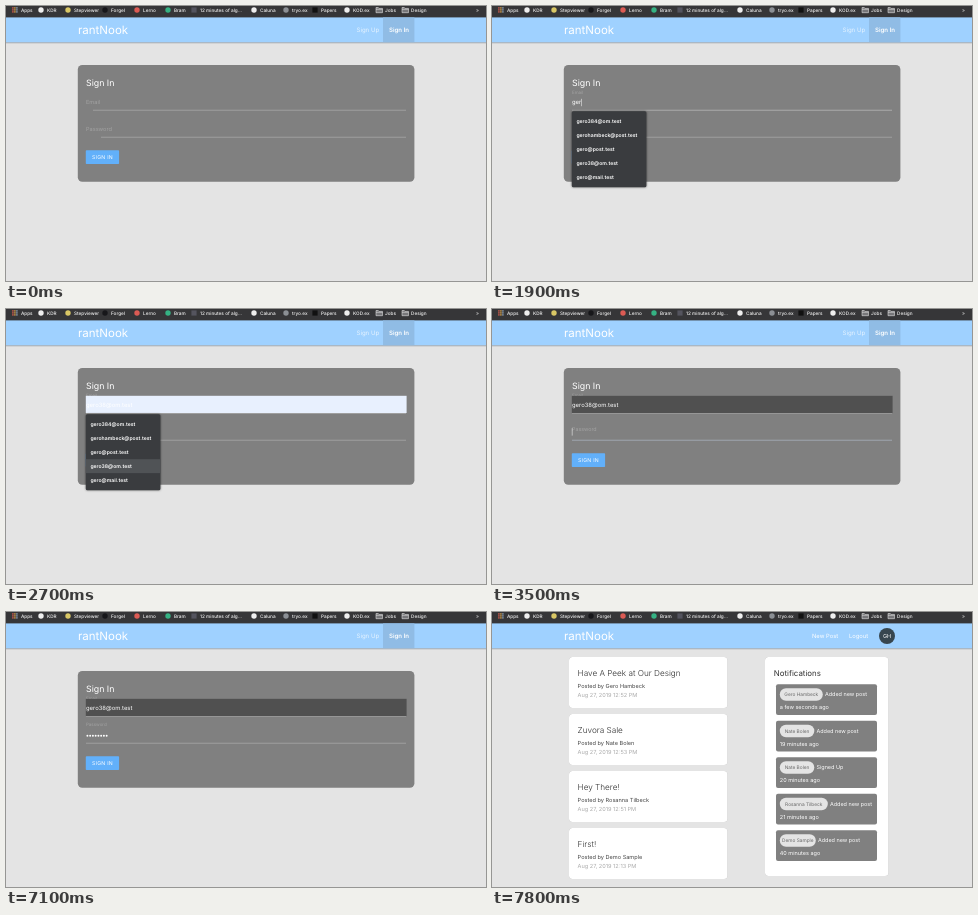
An HTML page for the animation above (8000 ms loop, 480 px wide and 275 px high).

```html
<!DOCTYPE html>
<html lang="en">
<head>
<meta charset="utf-8">
<title>Sign in</title>
<style>
  html, body { margin: 0; width: 100%; height: 100%; overflow: hidden; background: #e4e4e4; }
  svg { display: block; width: 100vw; height: 100vh; }
  text { font-family: Inter, Roboto, sans-serif; white-space: pre; text-rendering: geometricPrecision; }
  .lift { filter: drop-shadow(0 .6px .7px rgba(0, 0, 0, .3)); }
  .menu { filter: drop-shadow(0 .6px 1px rgba(0, 0, 0, .5)); }
</style>
</head>
<body>
<svg id="stage" viewBox="0 0 480 275"></svg>
<script>
const LOOP = 8000, STEP = 100;
const NS = 'http://www.w3.org/2000/svg';
const stage = document.getElementById('stage');

function add(parent, tag, attrs = {}) {
  const el = document.createElementNS(NS, tag);
  set(el, attrs);
  parent.append(el);
  return el;
}
function set(el, attrs) {
  for (const key in attrs) el.setAttribute(key, attrs[key]);
}
const group = (parent, attrs) => add(parent, 'g', attrs);
const box = (parent, x, y, width, height, fill, rx = 0, more = {}) =>
  add(parent, 'rect', { x, y, width, height, fill, rx, ...more });
const dot = (parent, cx, cy, r, fill) => add(parent, 'circle', { cx, cy, r, fill });
function label(parent, x, y, size, string, fill = '#fff', more = {}) {
  const el = add(parent, 'text', { x, y, 'font-size': size, fill, ...more });
  el.textContent = string;
  return el;
}
const show = (el, on) => set(el, { opacity: Number(on) });
const clamp = v => Math.min(1, Math.max(0, v));
const ramp = (t, from, to) => clamp((t - from) / (to - from));

// Browser bar
function drawBookmarks() {
  box(stage, 0, 0, 480, 11.4, '#363638');
  const bar = group(stage);
  for (let i = 0; i < 9; i++)
    box(bar, 6.2 + (i % 3) * 2, 1.2 + Math.floor(i / 3) * 2, 1.4, 1.4, ['#d9604f', '#d8a24a', '#8fa3b8'][i % 3]);
  const marks = [
    [15, 'Apps'], [41, 'KDR', '#eee'], [68, 'Stepviewer', '#d9c765'], [105, 'Forgel', '#17171a'],
    [137, 'Lerno', '#dc5b54'], [168, 'Bram', '#35b283'], [194, '12 minutes of alg...', '#54545e', 1],
    [254, 'Caluna', '#eee'], [286, 'tryo.ex', '#8b8f94'], [315, 'Papers', '#111', 1],
    [347, 'KOD.ex', '#eee'], [379, 'Jobs', 'folder'], [405, 'Design', 'folder']
  ];
  for (const [x, name, color, square] of marks) {
    if (color === 'folder') {
      add(bar, 'path', {
        d: `M${x - 9} 6.7V1.5h2.3l.8.9h3.4v4.3z M${x - 9} 3.3h6.5`,
        fill: '#77777a', stroke: '#ddd', 'stroke-width': .6
      });
    } else if (square) box(bar, x - 8.6, 1.4, 5.2, 5.2, color);
    else if (color) dot(bar, x - 6, 4, 2.7, color);
    label(bar, x, 5.7, 4.7, name, '#f4f4f4', { 'font-weight': 500 });
  }
  label(bar, 470, 5.6, 5, '»', '#ddd');
}

// Navigation
box(stage, 0, 11, 480, 25, '#9fd1ff');
box(stage, 0, 36, 480, 1, '#a9b8c6');
box(stage, 0, 37, 480, 1, '#d2d3d4');
drawBookmarks();
label(stage, 72, 28, 11.5, 'rantNook', '#fff', { 'font-weight': 400 });

const guestNav = group(stage);
box(guestNav, 377, 11.4, 31.4, 24.8, '#90bce5');
label(guestNav, 350.5, 26.2, 6.1, 'Sign Up', '#e6f3ff');
label(guestNav, 383, 26.2, 6.1, 'Sign In', '#fff', { 'font-weight': 600 });

const userNav = group(stage);
label(userNav, 320, 26, 5.8, 'New Post');
label(userNav, 357, 26, 5.8, 'Logout');
dot(userNav, 395, 24, 8, '#37464f');
label(userNav, 395, 26, 5.5, 'GH', '#fff', { 'text-anchor': 'middle' });

// Sign-in form
const form = group(stage);
box(form, 71.8, 59, 336.6, 116.8, '#808080', 4.5);
label(form, 80, 79.8, 8.8, 'Sign In');
const emailLine = box(form, 80, 103.8, 320, .8, '#a4a4a4');
const passLine = box(form, 80, 130.8, 320, .8, '#a4a4a4');
const blueLine = box(form, 80, 130.8, 320, .8, '#93b4e2');
const emailLabel = label(form, 0, 0, 5.6, 'Email', '#a2a2a2');
const passLabel = label(form, 0, 0, 5.6, 'Password', '#a2a2a2');
const field = box(form, 79.8, 86.8, 320.8, 17.2, '#505050');
const emailText = label(form, 80, 98.4, 5.9, '');
const caret = box(form, 80, 93, .7, 7.4, '#d8d8d8');
const dots = Array.from({ length: 8 }, (_, i) => dot(form, 81.4 + i * 2.75, 123.8, .95, '#fff'));
const buttonShade = box(form, 80, 144.4, 33, 13.6, '#5ba9f2', .8, { class: 'lift' });
box(form, 79.8, 144.2, 33.3, 13.8, '#62b0fa', .8);
label(form, 86, 153.2, 5.2, 'SIGN IN', '#fff', { 'letter-spacing': .25 });

// Autofill menu
const ALL = ['gast@foo.test', 'gero384@om.test', 'gerohambeck@post.test', 'gast2@foo.test', 'gast4@foo.test', 'gero@post.test'];
const PICK = 'gero38@om.test';
const FOUND = [ALL[1], ALL[2], ALL[5], PICK, 'gero@mail.test'];
function makeMenu(items) {
  const menu = group(form);
  box(menu, 79.8, 105.2, 74.6, items.length * 14 + 6, '#3a3c3f', 1.5, { class: 'menu' });
  const hover = box(menu, 79.8, 150.2, 74.6, 13.9, '#505356');
  items.forEach((item, i) =>
    label(menu, 84.4, 117.2 + i * 13.95, 5.1, item, '#fff', { 'font-weight': 600 }));
  return { menu, hover };
}
const fullMenu = makeMenu(ALL), foundMenu = makeMenu(FOUND);
show(fullMenu.hover, false);

// Feed
const feed = group(stage);
[
  ['Have A Peek at Our Design', 'Gero Hambeck', 52],
  ['Zuvora Sale', 'Nate Bolen', 53],
  ['Hey There!', 'Rosanna Tilbeck', 51],
  ['First!', 'Demo Sample', 13]
].forEach(([title, author, minute], i) => {
  const card = group(feed, { transform: `translate(77 ${45 + i * 57})` });
  box(card, 0, 0, 158.5, 51, '#fff', 3.5, { class: 'lift' });
  label(card, 8.6, 18.7, 8.2, title, '#333', { 'font-weight': 300 });
  label(card, 8.6, 31.2, 5.6, 'Posted by ' + author, '#444');
  label(card, 8.6, 39.7, 5.6, `Aug 27, 2019 12:${minute} PM`, '#aaa');
});
box(feed, 273, 45, 123.5, 219, '#fff', 3.5, { class: 'lift' });
label(feed, 281.8, 63.6, 7.9, 'Notifications', '#333');
[
  ['Gero Hambeck', 43, 'Added new post', 'a few seconds ago'],
  ['Nate Bolen', 34.5, 'Added new post', '19 minutes ago'],
  ['Nate Bolen', 34.5, 'Signed Up', '20 minutes ago'],
  ['Rosanna Tilbeck', 48, 'Added new post', '21 minutes ago'],
  ['Demo Sample', 36, 'Added new post', '40 minutes ago']
].forEach(([name, width, event, age], i) => {
  const note = group(feed, { transform: `translate(284 ${72.3 + i * 36.5})` });
  box(note, 0, 0, 101, 30.7, '#808080', 2);
  box(note, 3.8, 4, width, 12.5, '#e4e4e4', 6.2);
  label(note, 3.8 + width / 2, 12, 4.8, name, '#666', { 'text-anchor': 'middle' });
  label(note, width + 6, 12.2, 5.45, event);
  label(note, 3.8, 25, 5.5, age);
});

// Label floats from its resting line to above the field
function floatLabel(el, from, to, p) {
  set(el, { transform: `translate(80 ${from + (to - from) * p}) scale(${1 - .2 * p})` });
}

const TYPED_AT = [1600, 1700, 1800, 2000];
const DOTS_AT = [3900, 4100, 4300, 4500, 4600, 4800, 4900, 5100];
const countAt = (times, t) => times.filter(at => at <= t).length;

function draw(t) {
  const signedIn = t >= 7500;
  show(guestNav, !signedIn);
  show(userNav, signedIn);
  show(form, !signedIn);
  show(feed, t >= 7600);

  floatLabel(emailLabel, 98, 87.8, ramp(t, 0, 300));
  const focus = ramp(t, 3300, 3700) ** 2;
  floatLabel(passLabel, 125, 113.8, focus);

  const emailFocus = t >= 200 && t < 3200;
  const emailStart = t < 100 ? 87 : 80, passStart = t < 3200 ? 95 : 80;
  set(emailLine, { x: emailStart, width: 400 - emailStart, fill: emailFocus ? '#b4b4b4' : '#a4a4a4' });
  set(passLine, { x: passStart, width: 400 - passStart });
  show(blueLine, focus * (1 - ramp(t, 5500, 5800)));

  const typed = countAt(TYPED_AT, t);
  emailText.textContent = t >= 2500 ? PICK : PICK.slice(0, typed);
  const dark = ramp(t, 2900, 3200);
  const mix = (a, b) => Math.round(a + (b - a) * dark);
  set(field, { fill: `rgb(${mix(232, 80)},${mix(240, 80)},${mix(254, 80)})` });
  show(field, t >= 2500);

  show(fullMenu.menu, typed < 2 ? ramp(t, 1000, 1200) : 0);
  show(foundMenu.menu, typed >= 2 && t < 2900);
  show(foundMenu.hover, t >= 2500);

  const filled = countAt(DOTS_AT, t);
  dots.forEach((d, i) => show(d, i < filled));
  const inPass = t >= 3400 && t < 5600;
  const caretOn = inPass || (t >= 200 && t < 700) || (t >= 1100 && t < 2500);
  set(caret, {
    x: inPass ? 79.8 + filled * 2.75 : 79.8 + emailText.getComputedTextLength(),
    y: inPass ? 119.2 : 92.8
  });
  show(caret, caretOn);
  show(buttonShade, ramp(t, 3800, 4100) * (1 - ramp(t, 5500, 5800)));
}

const start = performance.now();
function tick() {
  const t = (performance.now() - start) % LOOP;
  draw(Math.floor(t / STEP) * STEP);
  requestAnimationFrame(tick);
}
tick();
</script>
</body>
</html>
```
